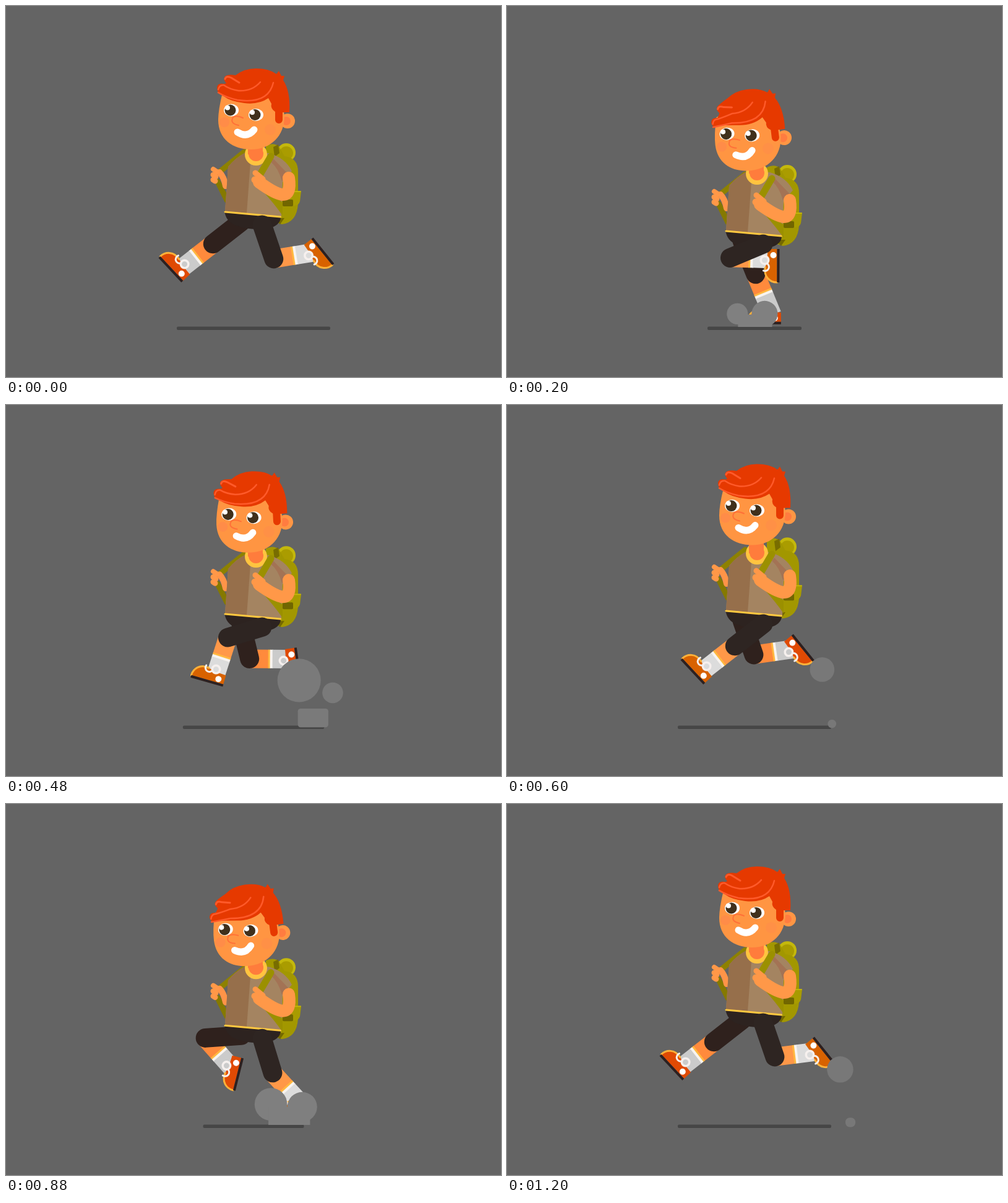
An HTML page with a canvas for the animation above (1220 ms loop, 800 by 600 pixels).

```html
<!DOCTYPE html>
<html lang="en">
<head>
<meta charset="utf-8">
<title>Running boy</title>
<style>
  html, body { margin: 0; width: 100%; height: 100%; overflow: hidden; background: #646464; }
  canvas { display: block; }
</style>
</head>
<body>
<canvas id="stage" width="800" height="600"></canvas>
<script>
const ctx = document.getElementById('stage').getContext('2d');
const LOOP = 1220, STEP = LOOP / 2, RAD = Math.PI / 180;

// Step phase: shirt, arms, pack and head drop, head turn, fringe sag, shadow half width
const BODY = [
  [0, 0, 0, 0, 0, 0, 0, 124],
  [150, 23, 25, 22, 22, -5.6, 6, 85],
  [200, 31, 36, 35, 33, -7, 15, 76],
  [360, 14, 16, 14, 18, -8, 9, 95],
  [390, 12, 13, 13, 15, -7, 2, 100],
  [590, 0, 0, 0, 0, 0, 0, 124],
  [610, 0, 0, 0, 0, 0, 0, 124]
];
// Cycle time: thigh, shin and foot direction in degrees, shin length
const LEG = [
  [0, 142, 142, 137, 60],
  [150, 89, 89, 90, 60],
  [200, 68, 68, 90, 66],
  [360, 80, 22, 42, 57],
  [390, 80, 9, 30, 58],
  [600, 71, -8, -39, 59],
  [760, 95, -28, -8, 57],
  [810, 157, 1, 0, 60],
  [970, 186, 86, 39, 56],
  [1000, 184, 82, 59, 57],
  [1200, 142, 142, 137, 60],
  [1220, 142, 142, 137, 60]
];
// Dust age: two puffs (x, y, r), then left, right, height and corner of the base
const DUST = [
  [100, 345, 512, 0, 385, 512, 0, 350, 380, 0, 0],
  [150, 358, 505, 13, 398, 502, 16, 351, 404, 14, 0],
  [200, 372, 498, 17, 416, 498, 21, 373, 428, 20, 0],
  [360, 430, 468, 38, 488, 479, 27, 416, 497, 36, 0],
  [390, 443, 461, 40, 502, 476, 28, 431, 509, 36, 1],
  [600, 509, 428, 20, 555, 452, 0, 518, 532, 14, 7],
  [680, 530, 418, 0, 570, 445, 0, 540, 540, 0, 0]
];

// Monotone cubic interpolation of every column
function sample(rows, t) {
  let i = 0;
  while (i < rows.length - 2 && t > rows[i + 1][0]) i++;
  const width = rows[i + 1][0] - rows[i][0];
  const u = Math.min(1, Math.max(0, (t - rows[i][0]) / width));
  const slope = (k, c) => (rows[k + 1][c] - rows[k][c]) / (rows[k + 1][0] - rows[k][0]);
  const tangent = (k, c) => {
    if (k === 0 || k === rows.length - 1) return 0;
    const a = slope(k - 1, c), b = slope(k, c);
    return a * b > 0 ? 2 * a * b / (a + b) : 0;
  };
  return rows[i].slice(1).map((from, n) => {
    const c = n + 1, v = 1 - u;
    return from * (1 + 2 * u) * v * v + rows[i + 1][c] * u * u * (3 - 2 * u) +
      width * (tangent(i, c) * u * v * v - tangent(i + 1, c) * u * u * v);
  });
}

function fill(path, color) {
  ctx.fillStyle = color;
  ctx.fill(new Path2D(path));
}
function line(path, color, width) {
  ctx.strokeStyle = color;
  ctx.lineWidth = width;
  ctx.stroke(new Path2D(path));
}
function disc(x, y, r, color, ry = r) {
  ctx.fillStyle = color;
  ctx.beginPath();
  ctx.ellipse(x, y, Math.max(0, r), Math.max(0, ry), 0, 0, 7);
  ctx.fill();
}
function box(x, y, w, h, color, corner = 0) {
  ctx.fillStyle = color;
  ctx.beginPath();
  ctx.roundRect(x, y, w, h, corner);
  ctx.fill();
}
function at(x, y, degrees, draw) {
  ctx.save();
  ctx.translate(x, y);
  ctx.rotate(degrees * RAD);
  draw();
  ctx.restore();
}

const FAR = { x: 380, y: 349, skin: '#ff8a3c', sock: '#cbcbcb', shoe: '#e04a04', cloth: '#2f211d' };
const NEAR = { x: 414, y: 354, skin: '#ff9848', sock: '#dcdcdc', shoe: '#d86200', cloth: '#2e2522' };

function drawShoe({ shoe, sock }) {
  const toe = 'M-14-3C-29-6-38 5-38 16';
  fill(toe + 'H16V1L0 0Z', shoe);
  line(toe, '#ffb23a', 3);
  box(-38, 16, 54, 4, '#2c2020');
  disc(6, 10, 5, '#fff');
  line('M-7-1A6 6 0 1 1-19-6', '#f6f0ee', 3);
  disc(-2, -4, 8, '#f6f0ee');
  disc(-2, -4, 4.5, sock);
}

function drawLeg(look, drop, time) {
  const [thigh, shin, foot, length] = sample(LEG, time);
  at(look.x, look.y + drop, thigh - 90, () => {
    at(0, 58, shin - thigh, () => {
      box(-15, 0, 30, 32, look.skin);
      box(-15, 30, 30, 4, '#ffb840');
      box(-15, 33, 30, 5, '#f8f4f0');
      box(-15, 37, 30, length - 32, look.sock);
      at(0, length, foot - shin, () => drawShoe(look));
    });
    line('M0 0V58', look.cloth, 31);
  });
}

function drawPack() {
  disc(453, 237, 15, '#c4b80c');
  disc(453, 238, 11, '#aa9c00');
  fill('M420 226Q432 220 441 227L450 243Q472 245 472 268V320Q470 350 446 353L420 345Z', '#a29700');
  fill('M432 228L440 224L442 238L434 244Z', '#786d00');
  fill('M447 300H477L475 316Q473 323 466 323H447Z', '#a89b00');
  box(447, 313, 17, 11, '#716600', 2);
  line('M448 300H476', '#c1b50a', 2);
  fill('M432 343H450L443 353Z', '#746800');
}

function drawFarArm() {
  line('M385 236L343 270', '#8d8100', 9);
  line('M342 284L357 314', '#857900', 9);
  line('M345 269Q352 276 355 291', '#ff9448', 10);
  line('M335 264L341 268', '#ff9848', 8);
  line('M335 273L339 276M335 281L338 283', '#ff9848', 9);
}

function drawShirt() {
  fill('M353 331L444 339Q445 352 430 358Q400 365 372 355Q355 349 353 331Z', '#2d2320');
  fill('M387 237Q370 246 359 260L354 332L445 341L447 285L462 267Q452 246 425 238Z', '#a48461');
  fill('M387 237Q370 246 359 260L354 332L389 335L396 240Z', '#966f4b');
  fill('M432 247L459 275L446 283Q440 262 428 252Z', '#a37355');
  line('M354 333L443.500 341', '#ffc840', 3);
}

function drawNeck() {
  disc(404, 240, 18, '#ffc440');
  disc(404, 239, 12, '#ff7c3c');
  box(391, 222, 24, 18, '#ff7c3c');
}

function drawNearArm() {
  line('M428 243L408 277', '#9b9000', 11);
  fill('M412 288L447 318V339Q434 320 412 296Z', '#9b9000');
  line('M457 278Q461 305 447 305Q435 304 409 285', '#ff9848', 20);
  line('M403 270L415 280', '#ff9848', 9);
  line('M402 281L408 286', '#ff9848', 11);
}

function drawEye(x, y, open) {
  disc(x, y, 12, '#fff', 10 * open);
  disc(x - 1.5, y, 9, '#40301c', 9 * open);
  disc(x - 6, y - 4 * open, 4, '#fff', 4 * open);
}

function drawHair(sag) {
  const low = 132 + sag, high = 118 + sag * .6;
  fill(`M341 ${low}Q342 ${low - 8} 352 ${low - 6}L356 ${high + 7}Q350 ${high} 354 ${high - 4}
    Q358 ${high - 8} 371 112Q385 101 404 101Q425 101 437 110L441 105L445 113L450 113L448 120
    Q460 138 458 172L447 172V184A6 6 0 0 1 435 184V171Q427 166 429 158L424 149
    Q408 160 385 157Q362 154 352 ${146 + sag * .5}Q341 ${low + 10} 341 ${low}Z`, '#e63900');
  line(`M343 ${low + 3}Q345 ${low - 5} 352 ${low - 4}Q362 ${135 + sag * .4} 376 137Q398 138 411 123`, '#ff5a2a', 2.5);
  line(`M354 ${high}Q356 ${high - 6} 364 ${high - 2}L377 ${124 + sag * .2}`, '#ff5a2a', 3);
  line(`M343 ${low + 8}Q356 ${148 + sag * .4} 374 152Q424 159 432 124`, '#ff5a2a', 2.5);
}

function drawHead(sag, open) {
  disc(455, 186, 12, '#ff9644');
  disc(453, 186, 7, '#ff7c40');
  fill('M350 140Q343 168 343 184C343 216 367 232 396 232C428 232 450 210 450 178L445 140L400 120Z', '#ff9542');
  disc(353, 188, 8, '#ff8c48');
  disc(427, 200, 9, '#ff9046');
  drawEye(364, 168.500, open);
  drawEye(404, 176, open);
  line('M383 181Q372 176 367 180Q361 190 376 193', '#ff7038', 2);
  line('M374 204Q390 214 401 200', '#fff', 11);
  drawHair(sag);
}

function drawDust(age, shift) {
  if (age < 100 || age > 680) return;
  const [ax, ay, ar, bx, by, br, left, right, height, corner] = sample(DUST, age);
  const tone = Math.round(132 - age * .02), color = `rgb(${tone},${tone},${tone})`;
  disc(ax + shift, ay, ar, color);
  disc(bx + shift, by, br, color);
  box(left + shift, 519 - height + corner / 2, right - left, height, color, corner);
}

const bump = (t, center, spread) => Math.exp(-(((t - center) / spread) ** 2));

function draw(t) {
  const [shirt, arms, pack, head, turn, sag, shadow] = sample(BODY, t % STEP);
  const lift = 12 * bump(t, 570, 35) + 5 * bump(t, 1160, 20);
  const open = 1 - .95 * Math.min(1, 1.3 * bump(t, 360, 45));

  ctx.lineCap = ctx.lineJoin = 'round';
  box(0, 0, 800, 600, '#646464');
  box(400 - shadow, 518.5, shadow * 2, 5.5, '#464646', 2);
  at(0, pack - lift * 1.4, 0, drawPack);
  ctx.lineCap = 'butt';
  ctx.lineCap = 'round';
  drawLeg(FAR, shirt, t);
  at(0, arms - lift * .35, 0, drawFarArm);
  at(0, shirt, 0, drawShirt);
  drawLeg(NEAR, shirt, (t + STEP) % LOOP);
  at(0, shirt, 0, drawNeck);
  at(0, arms - lift * .35, 0, drawNearArm);
  at(403, 240 + head - lift, turn, () => {
    ctx.translate(-403, -240);
    drawHead(sag, open);
  });
  drawDust(t, 0);
  drawDust(t - STEP, 32);
}

const start = performance.now();
function tick() {
  draw((performance.now() - start) % LOOP);
  requestAnimationFrame(tick);
}
tick();
</script>
</body>
</html>
```
